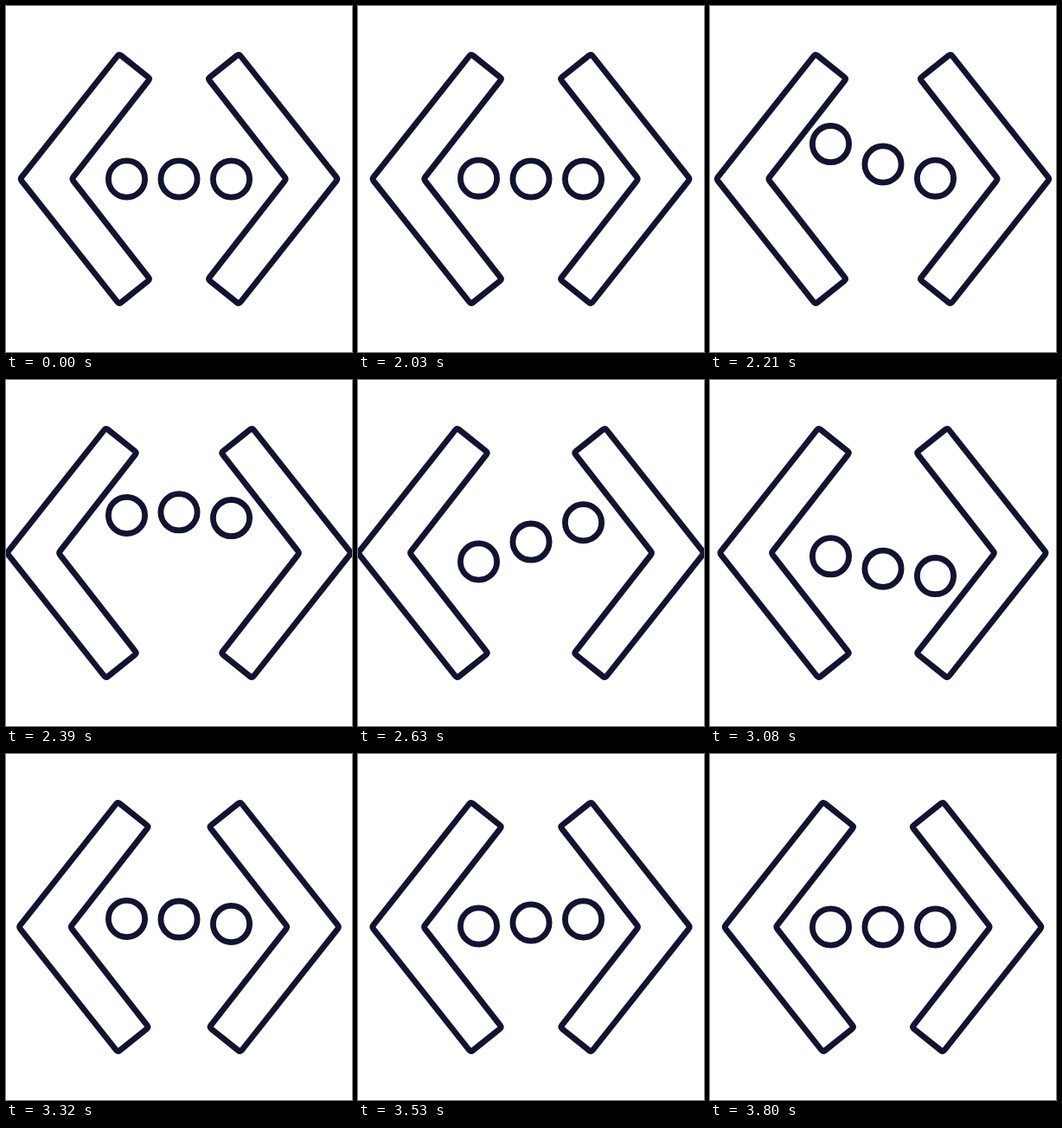
Write an HTML page that moves like this. It is 400 px wide and 400 px high and loops after 3830 ms.

```html
<!DOCTYPE html>
<html lang="en">
<head>
<meta charset="utf-8">
<title>Code brackets</title>
<style>
  html, body { margin: 0; width: 100%; height: 100%; overflow: hidden; background: #fff; }
  svg { display: block; width: 100%; height: 100%; }
</style>
</head>
<body>
<svg viewBox="0 0 400 400" fill="none" stroke="#121331" stroke-width="6.8" stroke-linejoin="round">
  <path id="left"/>
  <path id="right"/>
  <circle class="dot" cx="139.5" cy="200" r="21.1"/>
  <circle class="dot" cx="200" cy="200" r="21.1"/>
  <circle class="dot" cx="260.5" cy="200" r="21.1"/>
</svg>
<script>
  const LOOP = 3830, HOLD = 2000, STEP = 30, LAG = 3, CORNER = 3;
  const left = document.getElementById('left');
  const right = document.getElementById('right');
  const dots = [...document.querySelectorAll('.dot')];

  // Closed polygon whose corners are cut by a small curve.
  const roundedPath = points => points.map((p, i) => {
    const toward = q => {
      const k = CORNER / Math.hypot(q[0] - p[0], q[1] - p[1]);
      return p.map((v, axis) => v + (q[axis] - v) * k);
    };
    const before = points.at(i - 1), after = points[(i + 1) % points.length];
    return `${i ? 'L' : 'M'}${toward(before)}Q${p} ${toward(after)}`;
  }).join('') + 'Z';

  const outline = roundedPath([
    [16.3, 200], [130.7, 55.4], [166.5, 84], [76, 200], [166.5, 316], [130.7, 344.6]
  ]);
  left.setAttribute('d', outline);
  right.setAttribute('d', outline);

  // Cubic bezier easing with control points (x1, 0) and (x2, 1).
  const bezier = (x1, x2) => x => {
    let lo = 0, hi = 1;
    for (let i = 0; i < 24; i++) {
      const s = (lo + hi) / 2, r = 1 - s;
      if (3 * r * r * s * x1 + 3 * r * s * s * x2 + s ** 3 < x) lo = s;
      else hi = s;
    }
    return lo * lo * (3 - 2 * lo);
  };

  // Keys are [step, value] pairs.
  const track = (keys, ease) => n => {
    if (n <= keys[0][0]) return keys[0][1];
    for (let i = 1; i < keys.length; i++) {
      const [a, from] = keys[i - 1], [b, to] = keys[i];
      if (n < b) return from + (to - from) * ease((n - a) / (b - a));
    }
    return keys[keys.length - 1][1];
  };

  const spread = track([[0, 0], [19, 16.4], [58, 0]], bezier(0.4, 0.2));
  const bounce = track([[0, 200], [10.2, 152.8], [27.9, 228], [43, 190.3], [54, 200]], bezier(0.45, 0.45));

  function render(time) {
    const n = Math.max(0, Math.floor((time % LOOP - HOLD) / STEP));
    const shift = spread(n);
    left.setAttribute('transform', `translate(${-shift} 0)`);
    right.setAttribute('transform', `translate(${400 + shift} 0) scale(-1 1)`);
    dots.forEach((dot, i) => dot.setAttribute('cy', bounce(n - i * LAG)));
  }

  const start = performance.now();
  function tick() {
    render(performance.now() - start);
    requestAnimationFrame(tick);
  }
  tick();
</script>
</body>
</html>
```
